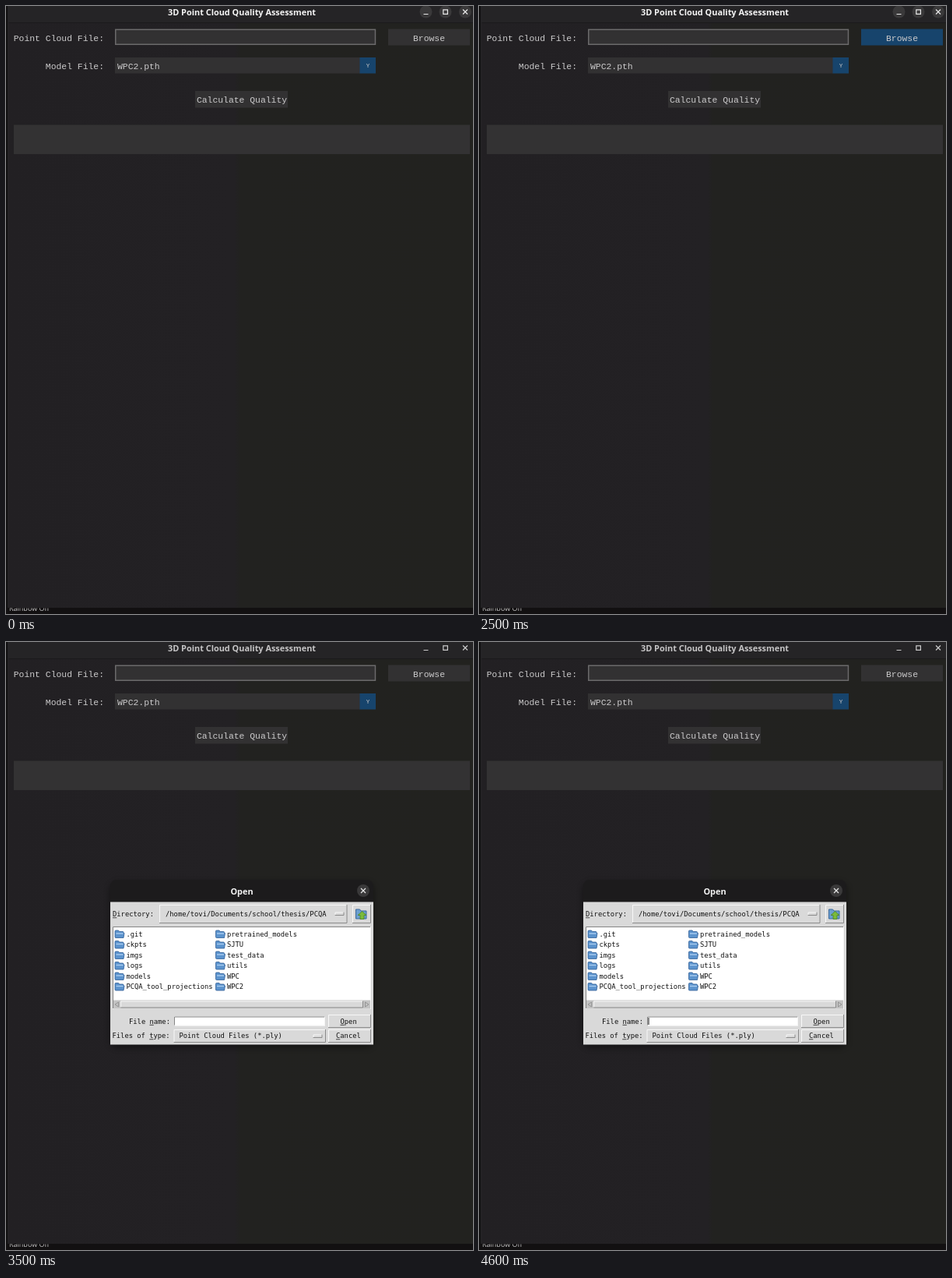
Write an HTML page that moves like this. It is 600 by 780 pixels and loops after 5000 ms.

```html
<!DOCTYPE html>
<html lang="en">
<head>
<meta charset="utf-8">
<title>Point cloud quality tool</title>
<style>
  html, body { margin: 0; width: 100%; height: 100%; overflow: hidden; background: #222120; }
  svg { display: block; width: 600px; height: 780px; }
  text { white-space: pre; }
  .mono { font: 11.4px "Liberation Mono", monospace; fill: #cbcacb; }
  .small { font: 8.8px "DejaVu Sans Mono", monospace; fill: #111; }
  .title { font: bold 10.9px "Open Sans", sans-serif; fill: #f4f4f4; text-anchor: middle; }
  .glyph { fill: none; stroke: #e8e8e8; stroke-width: 1.2; }
  .mid { text-anchor: middle; }
  .end { text-anchor: end; }
</style>
</head>
<body>
<svg id="stage" viewBox="0 0 600 780">
  <defs>
    <linearGradient id="backdrop">
      <stop offset="0" stop-color="#222023"/>
      <stop offset=".49" stop-color="#232124"/>
      <stop offset=".5" stop-color="#222220"/>
      <stop offset="1" stop-color="#22221f"/>
    </linearGradient>
    <clipPath id="bottomStrip"><rect y="772.5" width="600" height="8"/></clipPath>
    <filter id="blur" x="-10%" y="-10%" width="120%" height="125%"><feGaussianBlur stdDeviation="4"/></filter>
  </defs>
  <g id="main"></g>
  <g id="dialog"></g>
</svg>
<script>
const LOOP = 5000;
const BLUE = '#17446c', PANEL = '#323132';
const CHAR = 5.298; // advance of one small character

const rect = (x, y, w, h, fill, extra = '') =>
  `<rect x="${x}" y="${y}" width="${w}" height="${h}" fill="${fill}" ${extra}/>`;
const text = (x, y, str, cls, extra = '') =>
  `<text x="${x}" y="${y}" class="${cls}" ${extra}>${str}</text>`;
const path = (d, stroke, extra = '') => `<path d="${d}" fill="none" stroke="${stroke}" ${extra}/>`;
const cross = (x, y) =>
  `<path class="glyph" d="M${x - 3} ${y - 3}l6 6m0-6l-6 6"/>`;
const disc = (x, y, extra = '') => `<circle cx="${x}" cy="${y}" r="8" fill="#3a393a" ${extra}/>`;

// Classic bevelled box: light upper left, dark lower right (swapped when sunken).
function bevel(x, y, w, h, fill = '#d9d9d9', sunken = false) {
  const [a, b] = sunken ? ['#858585', '#f4f4f4'] : ['#f8f8f8', '#8a8a8a'];
  return rect(x, y, w, h, fill) +
    path(`M${x + .5} ${y + h}V${y + .5}H${x + w}`, a) +
    path(`M${x} ${y + h - .5}H${x + w - .5}V${y}`, b);
}

// Small text starting at x, with the character at the given index underlined.
function label(x, y, str, index = -1) {
  const line = index < 0 ? '' : rect(x + index * CHAR, y + 1.4, CHAR, .8, '#222');
  return text(x, y, str, 'small') + line;
}

const folder = (x, y) =>
  `<path d="M${x} ${y + 1.5}q0-1 1-1h3.5l1.2 1.5h4.3q1 0 1 1v1h1l-1 6H${x + 1}q-1 0-1-1z"
    fill="#5c93cd" stroke="#315f96" stroke-width=".8"/>` +
  path(`M${x + 1.5} ${y + 4.5}h9`, '#a9cdf0', 'stroke-width="1.4"');

function buildMain() {
  return rect(0, 0, 600, 780, 'url(#backdrop)') +
    rect(3, 0, 597, 21, '#252426') + rect(3, 21, 597, 1, '#1b1a1b') +
    rect(0, 0, 2.5, 780, '#111011') + rect(2.5, 0, 1, 772, '#2b292c') +
    rect(0, 772, 600, 8, '#121011') +
    `<g clip-path="url(#bottomStrip)">${text(4, 775.5, 'Rainbow Off', 'mono',
      'style="font:9px Open Sans,sans-serif"')}</g>` +
    text(303, 12, '3D Point Cloud Quality Assessment', 'title', 'id="heading"') +
    `<g id="discs">${[539.5, 564.5, 590].map(x => disc(x, 7.5)).join('')}</g>` +
    `<g id="glyphs"><path class="glyph" d="M536.5 10.5h6M561.8 4.8h5.6v5.6h-5.6z"/>${cross(590, 7.5)}</g>` +
    text(126, 44.5, 'Point Cloud File:', 'mono end') +
    rect(140.75, 30.25, 333.7, 19, PANEL, 'stroke="#6b6a6b" stroke-width="1.5"') +
    rect(491, 29.5, 105, 21, PANEL, 'id="browse"') +
    text(543.5, 44.5, 'Browse', 'mono mid') +
    text(126, 80.5, 'Model File:', 'mono end') +
    rect(140, 66, 315, 20.5, PANEL) + rect(454.5, 66, 20.5, 20.5, BLUE) +
    text(143, 80.5, 'WPC2.pth', 'mono') +
    text(465, 78.7, 'Y', 'mono mid', 'style="font-size:7.5px"') +
    rect(243, 109, 119, 21.5, PANEL) +
    text(303, 124, 'Calculate Quality', 'mono mid') +
    rect(10, 152.5, 586, 37.5, '#333233');
}

function buildDialog() {
  const columns = [
    [140, ['.git', 'ckpts', 'imgs', 'logs', 'models', 'PCQA_tool_projections']],
    [269.5, ['pretrained_models', 'SJTU', 'test_data', 'utils', 'WPC', 'WPC2']],
  ];
  const files = columns.map(([x, names]) => names.map((name, i) => {
    const y = 369.5 + i * 13.5;
    return folder(x, y) + label(x + 14.4, y + 8, name);
  }).join('')).join('');

  return rect(134, 309, 338, 211, '#000', 'rx="9" opacity=".45" filter="url(#blur)"') +
    `<path d="M134 517V314q0-9 9-9H463q9 0 9 9V517z" fill="#1c1b1c"/>` +
    rect(134, 333.5, 338, 183, '#d9d9d9') +
    text(303, 323.5, 'Open', 'title') + disc(459, 319) + cross(459, 319) +
    label(137, 352, 'Directory:', 0) +
    bevel(197, 337, 241.5, 24) + label(205, 352, '/home/tovi/Documents/school/thesis/PCQA') +
    bevel(422.5, 346.5, 12, 4.5) +
    bevel(445, 337, 24, 24) +
    `<path d="M449.5 343h5l1.5 2h7v10h-13.500z" fill="#6c9fd0" stroke="#3b689c"/>` +
    `<path d="M457.500 345.500l5.500 5h-3v5h-5v-5h-3z" fill="#7bbb3b" stroke="#4c8423" stroke-width=".8"/>` +
    bevel(137, 365, 332, 106, '#fff', true) + files +
    rect(138, 459.5, 330, 11, '#c3c3c3') + bevel(147, 460.5, 312, 9) +
    path('M144.500 462l-4.500 3l4.500 3zM461.500 462l4.500 3l-4.500 3z', '#888', 'stroke-width=".8"') +
    label(158, 489.5, 'File name:', 5) +
    bevel(216, 480.5, 194, 12, '#fff', true) + rect(217.5, 482, 1, 9, '#111', 'id="caret"') +
    bevel(414, 478, 55, 17) + label(429.5, 489.5, 'Open', 0) +
    label(136.500, 508, 'Files of type:', 9) +
    bevel(215.5, 497, 195.5, 17) + label(222.500, 508, 'Point Cloud Files (*.ply)') +
    bevel(394.5, 503.5, 12, 4.5) +
    bevel(414, 497, 55, 17) + label(424, 508, 'Cancel', 0);
}

const get = id => document.getElementById(id);
get('main').innerHTML = buildMain();
get('dialog').innerHTML = buildDialog();

const show = (id, visible) => get(id).setAttribute('visibility', visible ? 'inherit' : 'hidden');
const within = (t, from, to) => t >= from && t < to;

function draw(now) {
  const t = now % LOOP;
  const open = t >= 2800, growing = within(t, 2800, 2900);

  get('browse').setAttribute('fill', within(t, 2400, 2800) ? BLUE : PANEL);
  show('discs', !open);
  get('heading').style.fill = open ? '#c6c5c6' : '#f4f4f4';
  get('glyphs').setAttribute('opacity', open ? .85 : 1);

  show('dialog', open);
  get('dialog').setAttribute('opacity', growing ? .6 : 1);
  get('dialog').setAttribute('transform',
    `translate(0 411) scale(1 ${growing ? .64 : 1}) translate(0 -411)`);
  show('caret', !within(t, 3300, 3600) && !within(t, 4300, 4600));
  requestAnimationFrame(() => draw(performance.now() - start));
}

const start = performance.now();
draw(0);
</script>
</body>
</html>
```
